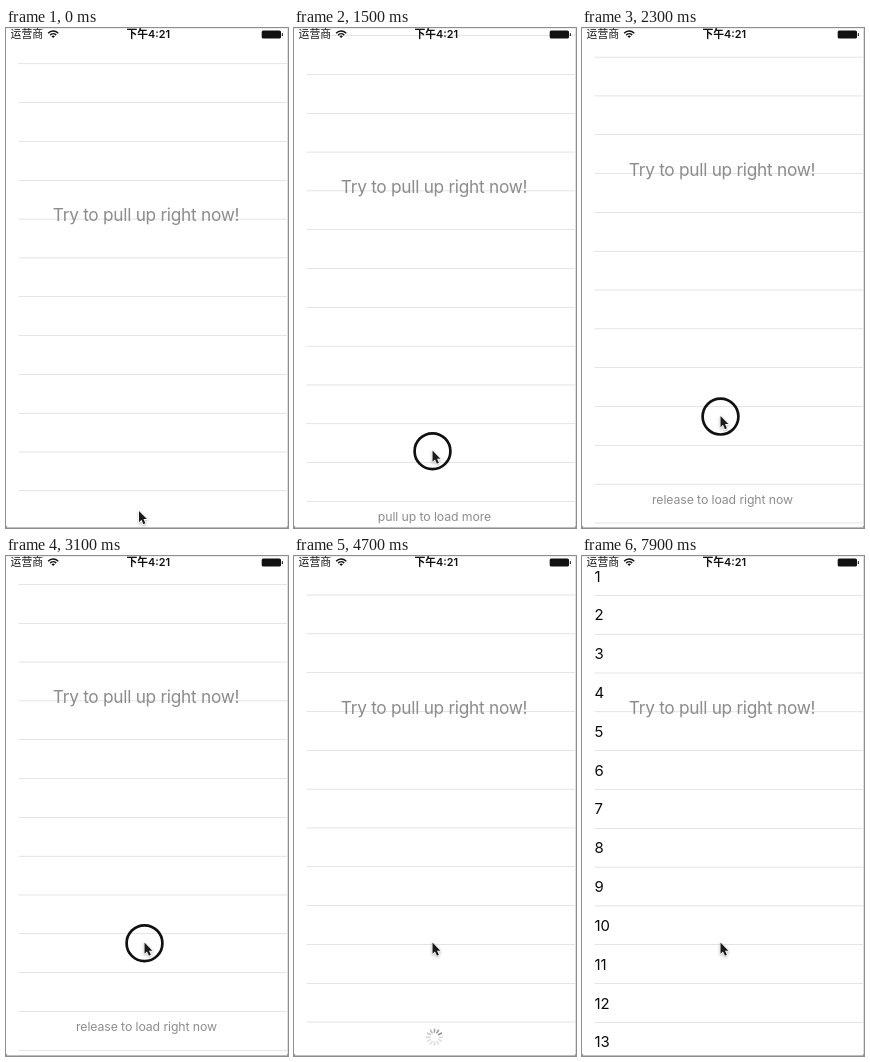
Animation, 282 px wide and 500 px high, one loop 8000 ms. Source, as an HTML page with a canvas:

```html
<!DOCTYPE html>
<html lang="zh">
<head>
<meta charset="utf-8">
<style>
html, body { margin: 0; width: 100%; height: 100%; overflow: hidden; background: #fff; }
canvas { display: block; width: 282px; height: 500px; }
</style>
</head>
<body>
<canvas id="stage"></canvas>
<script>
const W = 282, H = 500, LOOP = 8000, STEP = 200;
const ROW = 38.82, FOOTER = 35.25;
const RELEASE = 4100, LOADING = 4300, LOADED = 7900;
const FONT = 'Inter, "Noto Sans CJK SC", "Noto Sans CJK", "Noto Sans CJK JP", sans-serif';

const canvas = document.getElementById('stage');
const ctx = canvas.getContext('2d');
const dpr = window.devicePixelRatio || 1;
canvas.width = W * dpr;
canvas.height = H * dpr;

// Keyframes: [time, value]
const pointerX = [[0, 132.5], [500, 132.5], [900, 135.5], [1500, 138]];
const pointerY = [[0, 482], [100, 484], [500, 484], [700, 477.5], [900, 468.2],
  [1500, 421.6], [1700, 410], [1900, 400.5], [2100, 392.5], [2300, 387], [2500, 385.6]];
const settle = [[4100, 46.4], [4300, 41.5], [4500, 36.8], [4700, 35.6], [4900, FOOTER]];

function at(keys, t) {
  if (t <= keys[0][0]) return keys[0][1];
  for (let i = 1; i < keys.length; i++) {
    const [t0, a] = keys[i - 1], [t1, b] = keys[i];
    if (t < t1) return a + (b - a) * (t - t0) / (t1 - t0);
  }
  return keys[keys.length - 1][1];
}

function text(str, x, y, size, color, align = 'left', weight = 400, spacing = 0) {
  ctx.font = `${weight} ${size}px ${FONT}`;
  ctx.letterSpacing = `${spacing}px`;
  ctx.fillStyle = color;
  ctx.textAlign = align;
  ctx.fillText(str, x, y);
}

function rect(x, y, w, h, color) {
  ctx.fillStyle = color;
  ctx.fillRect(x, y, w, h);
}

function drawRows(shift, loaded) {
  const first = 35.8 - shift;
  for (let i = 0; i < 15; i++) {
    const y = first + ROW * i;
    rect(12.6, y - 0.25, W - 13.6, 0.5, '#c8c7cc');
    if (loaded && i) text(String(i), 12.4, y - ROW / 2 + 5.6, 14.9, '#0a0a0a');
  }
}

function drawSpinner(x, y, t) {
  const head = Math.floor(t * 12 / 1000) + 6;
  ctx.lineWidth = 1.5;
  ctx.lineCap = 'round';
  for (let i = 0; i < 12; i++) {
    const age = ((head - i) % 12 + 12) % 12;
    const a = i * Math.PI / 6 - Math.PI / 2;
    const c = Math.cos(a), s = Math.sin(a);
    ctx.strokeStyle = `rgba(110,110,114,${Math.max(0.24, 0.85 - age * 0.11)})`;
    ctx.beginPath();
    ctx.moveTo(x + c * 4.8, y + s * 4.8);
    ctx.lineTo(x + c * 8, y + s * 8);
    ctx.stroke();
  }
}

function drawFooter(shift, t) {
  const mid = H + FOOTER / 2 - shift;
  if (t >= LOADED) return;
  if (t >= LOADING) return drawSpinner(140.5, mid - 0.9, t);
  const label = shift > FOOTER ? 'release to load right now' : 'pull up to load more';
  text(label, 140.5, mid + 3.4, 12.3, '#8e8e8e', 'center', 400, -0.1);
}

function drawStatus() {
  text('运营商', 4.6, 10.4, 10.8, '#111');
  text('下午4:21', 142.2, 10.4, 10.8, '#111', 'center', 600);

  const x = 47.2, y = 10;
  ctx.strokeStyle = ctx.fillStyle = '#111';
  ctx.lineWidth = 1.5;
  ctx.lineCap = 'butt';
  for (const r of [4.2, 6.9]) {
    ctx.beginPath();
    ctx.arc(x, y, r, -Math.PI * 0.76, -Math.PI * 0.24);
    ctx.stroke();
  }
  ctx.beginPath();
  ctx.moveTo(x, y);
  ctx.arc(x, y, 2.4, -Math.PI * 0.76, -Math.PI * 0.24);
  ctx.fill();

  ctx.fillStyle = '#111';
  ctx.beginPath();
  ctx.roundRect(255.7, 2.5, 19.3, 8.1, 1.6);
  ctx.fill();
  rect(275.8, 5.2, 1.2, 2.8, '#333');
}

function drawRing(x, y) {
  ctx.strokeStyle = '#111';
  ctx.lineWidth = 2.7;
  ctx.beginPath();
  ctx.arc(x, y, 17.9, 0, Math.PI * 2);
  ctx.stroke();
}

function drawPointer(x, y) {
  const shape = [[0, 0], [0, 12.4], [2.8, 9.8], [4.9, 14.6], [7.1, 13.6], [5, 9], [8.8, 9]];
  ctx.save();
  ctx.translate(x + 0.5, y + 1);
  ctx.scale(0.9, 0.9);
  ctx.beginPath();
  shape.forEach(([px, py]) => ctx.lineTo(px, py));
  ctx.closePath();
  ctx.lineJoin = 'round';
  ctx.lineWidth = 1.8;
  ctx.strokeStyle = '#fff';
  ctx.shadowColor = 'rgba(0,0,0,0.3)';
  ctx.shadowBlur = 2.5 * dpr;
  ctx.shadowOffsetY = dpr;
  ctx.stroke();
  ctx.shadowColor = 'transparent';
  ctx.fillStyle = '#1a1a1a';
  ctx.fill();
  ctx.restore();
}

function drawEdges() {
  rect(0, 0, W, 1, '#ececec');
  rect(W - 1, 0, 1, H, '#dedede');
  rect(0, H - 1, W, 1, '#bdbdbd');
  rect(0, H - 2, 1, 2, '#999');
  rect(W - 1, H - 2, 1, 2, '#999');
}

function draw(t) {
  const x = at(pointerX, t), y = at(pointerY, t);
  const shift = t < RELEASE ? Math.max(0, (478 - y) / 2) : at(settle, t);
  ctx.setTransform(dpr, 0, 0, dpr, 0, 0);
  rect(0, 0, W, H, '#fff');
  drawRows(shift, t >= LOADED);
  text('Try to pull up right now!', 140, 193.4 - shift, 17.3, '#8c8c8c', 'center', 400, -0.28);
  drawFooter(shift, t);
  drawEdges();
  drawStatus();
  if (t >= 500 && t < RELEASE) drawRing(x + 0.5, y + 1.6);
  drawPointer(x, y);
}

const start = performance.now();
function tick() {
  const t = (performance.now() - start) % LOOP;
  draw(Math.max(0, Math.floor((t + STEP / 2) / STEP) * STEP - STEP / 2));
  requestAnimationFrame(tick);
}
tick();
</script>
</body>
</html>
```
